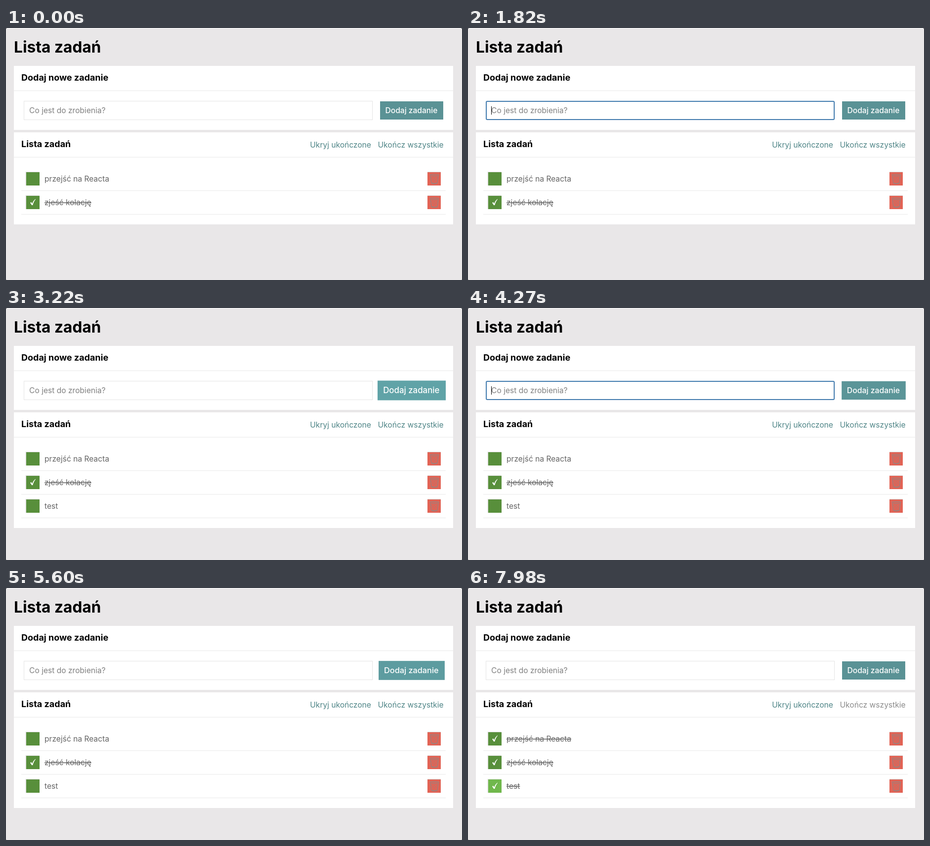
These frames come from a looping animation (924x512 px, 8 s). An HTML page:

```html
<!DOCTYPE html>
<html lang="pl">
<head>
<meta charset="utf-8">
<title>Lista zadań</title>
<style>
html, body { margin: 0; height: 100%; overflow: hidden; background: #e9e7e8; }
svg { display: block; width: 100vw; height: 100vh; font: 15.6px Inter, "Open Sans", sans-serif; }
h1, .h1 { font-size: 31.7px; font-weight: 700; }
.h2 { font-size: 18px; font-weight: 700; }
.done { text-decoration: line-through; }
</style>
</head>
<body>
<svg id="stage" viewBox="0 0 924 512">
  <rect width="924" height="512" fill="#e9e7e8"/>
  <rect width="924" height="1" fill="#fbfbfb"/>
  <path d="M0 0h2l-2 2zM924 0h-2l2 2zM0 512h1l-1 -1zM924 512h-1l1 -1z" fill="#555"/>
  <text class="h1" x="16" y="50">Lista zadań</text>

  <rect x="16" y="77" width="890" height="130" fill="#fff"/>
  <rect x="16" y="127" width="890" height="1" fill="#e9e9e9"/>
  <text class="h2" x="31" y="107">Dodaj nowe zadanie</text>
  <rect id="field" fill="#fff"/>
  <text id="value" x="47" y="173"></text>
  <rect id="caret" y="159" width="1" height="17"/>
  <g id="button">
    <rect id="face" x="758" y="149" width="128" height="37"/>
    <text x="768.5" y="173" fill="#fff" font-weight="500">Dodaj zadanie</text>
  </g>

  <rect id="panel" x="16" y="212" width="890" fill="#fff"/>
  <rect x="16" y="262" width="890" height="1" fill="#e9e9e9"/>
  <text class="h2" x="31" y="242">Lista zadań</text>
  <text x="616" y="243" fill="#4f8587">Ukryj ukończone</text>
  <text id="all" x="753.5" y="243">Ukończ wszystkie</text>
  <g id="rows"></g>
</svg>
<script>
const LOOP = 8000, STEP = 70;
const FOCUS = [[1680, 3150], [4060, 4800]];
const KEYS = [1960, 2100, 2240, 2380];
const ADDED = 3150, FIRST_DONE = 6500, LAST_DONE = 7100;

const $ = id => document.getElementById(id);
const set = (el, attrs) => {
  for (const k in attrs) el.setAttribute(k, attrs[k]);
};
const mix = (a, b, p) => `rgb(${a.map((v, i) => Math.round(v + (b[i] - v) * p))})`;

// CSS "ease": cubic-bezier(.25, .1, .25, 1)
function ease(x) {
  if (x <= 0) return 0;
  if (x >= 1) return 1;
  let lo = 0, hi = 1, s;
  for (let i = 0; i < 20; i++) {
    s = (lo + hi) / 2;
    const bx = .75 * s * (1 - s) + s ** 3;
    if (bx < x) lo = s; else hi = s;
  }
  return .3 * s * (1 - s) ** 2 + 3 * s * s * (1 - s) + s ** 3;
}

// One-second hover transition that is shortened when reversed early
function hover(t, from, to) {
  if (t < to) return ease((t - from) / 1000);
  const peak = ease((to - from) / 1000);
  return peak * (1 - ease((t - to) / (1000 * peak)));
}

const BIN = `<g fill="none" stroke="#8f8583">
  <ellipse cx="14" cy="6" rx="9" ry="1.6" stroke-width="1.2"/>
  <path d="M6 8l2 14q6 3 12 0l2 -14M8 21.5q6 2.6 12 0" stroke-width="1.1"/>
  <path d="M7 10l11 12M11 9l9 9M17 9l4 4M21 10l-11 12M17 9l-9 9M11 9l-4 4" stroke-width=".7" opacity=".6"/></g>`;

$("rows").innerHTML = ["przejść na Reacta", "zjeść kolację", "test"].map((label, i) => `
  <g transform="translate(0 ${282 + 48 * i})">
    <rect x="39.5" y="10" width="28" height="28" fill="#dedede"/>
    <rect class="toggle" x="41" y="11" width="27" height="27"/>
    <path class="tick" d="M49 25l2.3 -1.2 1.7 3.2q2 -6 6.5 -9.5l.6 .6q-4 4.500 -6 12h-1.800z" fill="#fff"/>
    <text class="label" x="78" y="30" fill="#666">${label}</text>
    <g transform="translate(854 11)"><rect width="27" height="27" fill="#e26355"/>
      <rect y="-1" width="27" height="1" fill="#d5dcdc"/>${BIN}</g>
    <rect x="31" y="48" width="860" height="1" fill="#e9e9e9"/>
  </g>`).join("");
const rows = [...$("rows").children];

function draw(t) {
  const session = FOCUS.find(([a, b]) => t >= a && t < b);
  const typed = t < ADDED ? "test".slice(0, KEYS.filter(k => t >= k).length) : "";
  const value = $("value");
  value.textContent = typed || "Co jest do zrobienia?";
  set(value, { fill: typed ? "#111" : "#808080" });

  set($("field"), session
    ? { x: 37, y: 149, width: 705, height: 37, rx: 2, stroke: "#427bae", "stroke-width": 2 }
    : { x: 36.5, y: 148.5, width: 706, height: 38, rx: 0, stroke: "#e4e4e4", "stroke-width": 1 });

  // The caret restarts its blink on focus and on each key
  const since = session ? t - Math.max(session[0], ...KEYS.filter(k => k <= t)) : 500;
  set($("caret"), {
    x: typed ? Math.round(47 + value.getComputedTextLength()) : 47,
    visibility: since % 1000 < 500 ? "visible" : "hidden"
  });

  const grow = Math.max(hover(t, 2725, 3700), hover(t, 4400, 5290));
  set($("button"), {
    transform: `translate(822 167.5) scale(${1 + grow / 10}) translate(-822 -167.5)`
  });
  set($("face"), { fill: mix([90, 146, 149], [97, 167, 172], grow) });

  set($("all"), { fill: mix([79, 133, 135], [139, 139, 139], ease((t - LAST_DONE) / 1000)) });

  set($("panel"), { height: t >= ADDED ? 235 : 187 });
  const done = [t >= FIRST_DONE, true, t >= LAST_DONE];
  const glow = [hover(t, 6250, 6680), 0, hover(t, 6760, LOOP)];
  rows.forEach((row, i) => {
    set(row, { visibility: i < 2 || t >= ADDED ? "visible" : "hidden" });
    set(row.querySelector(".toggle"), { fill: mix([88, 143, 59], [112, 184, 76], glow[i]) });
    set(row.querySelector(".tick"), { opacity: done[i] ? 1 : 0 });
    row.querySelector(".label").classList.toggle("done", done[i]);
  });
}

const start = performance.now();
function tick() {
  const t = (performance.now() - start) % LOOP;
  draw(Math.floor(t / STEP) * STEP);
  requestAnimationFrame(tick);
}
tick();
</script>
</body>
</html>
```
